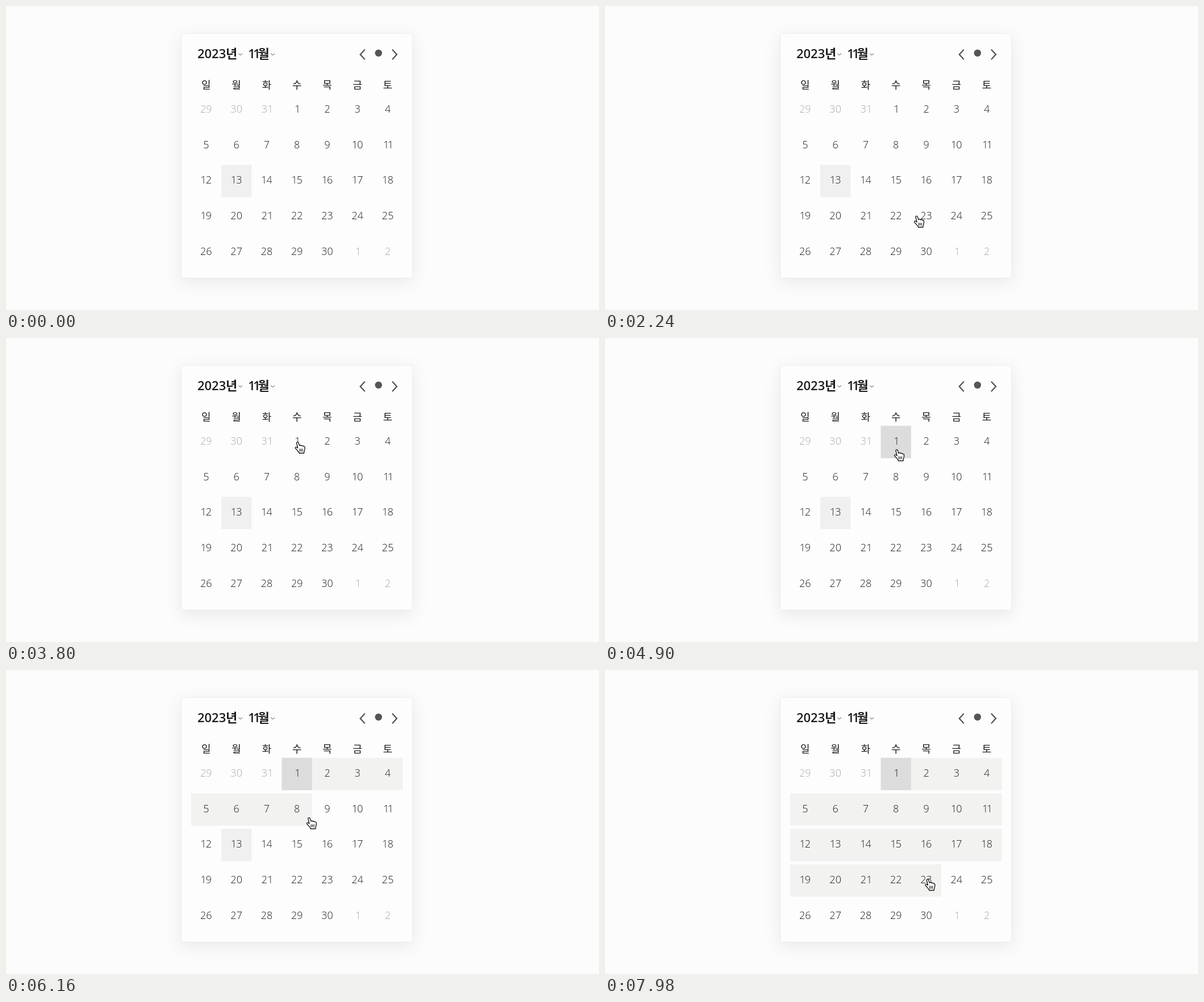
Recreate the animation shown at these times as an HTML page. Size 1044 px wide and 536 px high, loop 8 s.

```html
<!DOCTYPE html>
<html lang="ko">
<head>
<meta charset="utf-8">
<title>Calendar range picker</title>
<style>
  html, body { margin: 0; width: 100%; height: 100%; overflow: hidden; background: #fcfcfc; }
  #stage { position: relative; width: 1044px; height: 536px; overflow: hidden; }
  #card {
    position: absolute; left: 308px; top: 48px; width: 406px; height: 430px;
    border: 1px solid #eeeef5; border-radius: 4px; background: #fdfdfd;
    box-shadow: 0 7px 29px rgba(100, 100, 118, .13);
  }
  svg { position: absolute; left: 0; top: 0; }
  text { fill: #1c1c1c; }
  .day { font: 300 18px "Open Sans", "Noto Sans", sans-serif; text-anchor: middle; }
  .week { font: 300 18px "Noto Sans CJK KR", "Noto Sans CJK", sans-serif; text-anchor: middle; }
  .out { fill: #a9a9a9; }
  .num { font: 600 22px "Open Sans", "Noto Sans", sans-serif; }
  .kor { font: 700 22px "Noto Sans CJK KR", "Noto Sans CJK", sans-serif; }
</style>
</head>
<body>
<div id="stage">
  <div id="card"></div>
  <svg width="1044" height="536" viewBox="0 0 1044 536">
    <g id="cells"></g>
    <text class="num" x="337" y="91.5">2023</text>
    <text class="kor" x="387" y="92">년</text>
    <text class="num" x="426.3" y="91.5" dx="0 -3.6">11</text>
    <text class="kor" x="443.5" y="92">월</text>
    <g fill="none" stroke="#444" stroke-width="1">
      <path d="M409.3 84l3.3 2.6 3.3-2.6M466.3 84l3.3 2.6 3.3-2.6"/>
      <path d="M631.8 76.8l-8 8.7 8 8.7M680 76.8l8 8.7-8 8.7" stroke="#555" stroke-width="2.3"/>
    </g>
    <circle cx="655.8" cy="83" r="6.2" fill="#555"/>
    <g id="labels"></g>
    <g id="arrow">
      <path d="M0 0V16L3.8 12.5L6.3 18.2L8.8 17.1L6.3 11.6H11.5Z" stroke="#fff" stroke-width="1"/>
    </g>
    <g id="hand" stroke="#111" stroke-width="1.35" stroke-linejoin="round" stroke-linecap="round">
      <path fill="#fff" d="M-1.8 1.4C-1.8-.4.9-.7 1.5.9L3.3 6.2C4 5 6.3 5.2 6.6 6.6C7.5 5.6 9.5 6 9.8 7.4C11 6.8 12.8 7.6 12.8 9.2C13.2 13 12 14.5 11.5 17L11.3 19.5H2.8L2.5 18C0 15.5-1 13.5-3.6 11.2C-4.8 9.5-3.3 8-1.7 9L.4 10.4Z"/>
      <path fill="none" stroke-width="1.1" d="M3.7 12v4.3M6.2 12v4.3M8.7 12v4.3"/>
    </g>
  </svg>
</div>
<script>
const LOOP = 8000, COL = 53.3, ROW = 62.6, LEFT = 325.7, TOP = 154.8;
const FIRST = 3, TODAY = 15;
const $ = id => document.getElementById(id);

function add(parent, tag, attrs, text) {
  const el = document.createElementNS('http://www.w3.org/2000/svg', tag);
  for (const k in attrs) el.setAttribute(k, attrs[k]);
  if (text) el.textContent = text;
  return parent.appendChild(el);
}

[...'일월화수목금토'].forEach((c, i) =>
  add($('labels'), 'text', { class: 'week', x: LEFT + COL * (i + .5), y: 145.7 }, c));

for (let i = 0; i < 35; i++) {
  const n = i < FIRST ? 29 + i : (i - FIRST) % 30 + 1;
  const s = String(n), out = i < FIRST || i >= FIRST + 30;
  // tighten a leading 1 and recentre a trailing 1
  const kern = n === 11 ? -2.5 : s[0] === '1' ? -1 : 0;
  add($('labels'), 'text', {
    class: out ? 'day out' : 'day',
    x: LEFT + COL * (i % 7 + .5) + (s.endsWith('1') ? 1.2 : 0),
    y: 188.1 + ROW * Math.floor(i / 7),
    dx: s.length > 1 ? '0 ' + kern : '0'
  }, s);
}

const fills = [];
for (let r = 0; r < 5; r++) {
  const y = TOP + ROW * r;
  fills.push(add($('cells'), 'rect', { x: LEFT, y, width: 0, height: 57, fill: '#f2f2f1' }));
}
const box = (i, fill) => add($('cells'), 'rect', {
  x: LEFT + COL * (i % 7), y: TOP + ROW * Math.floor(i / 7), width: COL, height: 57, fill
});
const today = box(TODAY, '#f0f0f1');
const start = box(FIRST, '#dcdcdd');

// time, x, y of the pointer tip
const path = [
  [1480, 547, 537], [1560, 548, 529], [1900, 550, 468], [2400, 548, 325],
  [2960, 534.7, 189.5], [3300, 524, 181], [3800, 513.3, 183.5], [4200, 513.7, 197],
  [5640, 513.7, 197], [6100, 530, 250], [6460, 551, 312], [6740, 562, 345],
  [7300, 566.5, 364], [7980, 568, 369]
];
// time, last cell of the range
const range = [[0, -1], [4880, 3], [5820, 10], [6290, 18], [6780, 25]];

function pointer(t) {
  let i = path.findIndex(p => p[0] > t);
  if (i < 0) return path[path.length - 1].slice(1);
  if (i === 0) return path[0].slice(1);
  const a = path[i - 1], b = path[i], k = (t - a[0]) / (b[0] - a[0]);
  return [a[1] + (b[1] - a[1]) * k, a[2] + (b[2] - a[2]) * k];
}

const show = (el, on) => el.setAttribute('visibility', on ? 'visible' : 'hidden');

function draw(t) {
  const end = range.filter(r => r[0] <= t).pop()[1];
  fills.forEach((el, r) => {
    const from = Math.max(r * 7, FIRST), to = Math.min(r * 7 + 6, end);
    el.setAttribute('x', LEFT + COL * (from - r * 7));
    el.setAttribute('width', Math.max(0, to - from + 1) * COL);
  });
  show(start, end >= FIRST);
  show(today, end < TODAY);
  const [x, y] = pointer(t), overDays = y < 462;
  for (const id of ['arrow', 'hand']) {
    $(id).setAttribute('transform', `translate(${x} ${y})`);
    show($(id), t >= 1480 && overDays === (id === 'hand'));
  }
}

const t0 = performance.now();
function tick() {
  draw((performance.now() - t0) % LOOP);
  requestAnimationFrame(tick);
}
tick();
</script>
</body>
</html>
```
